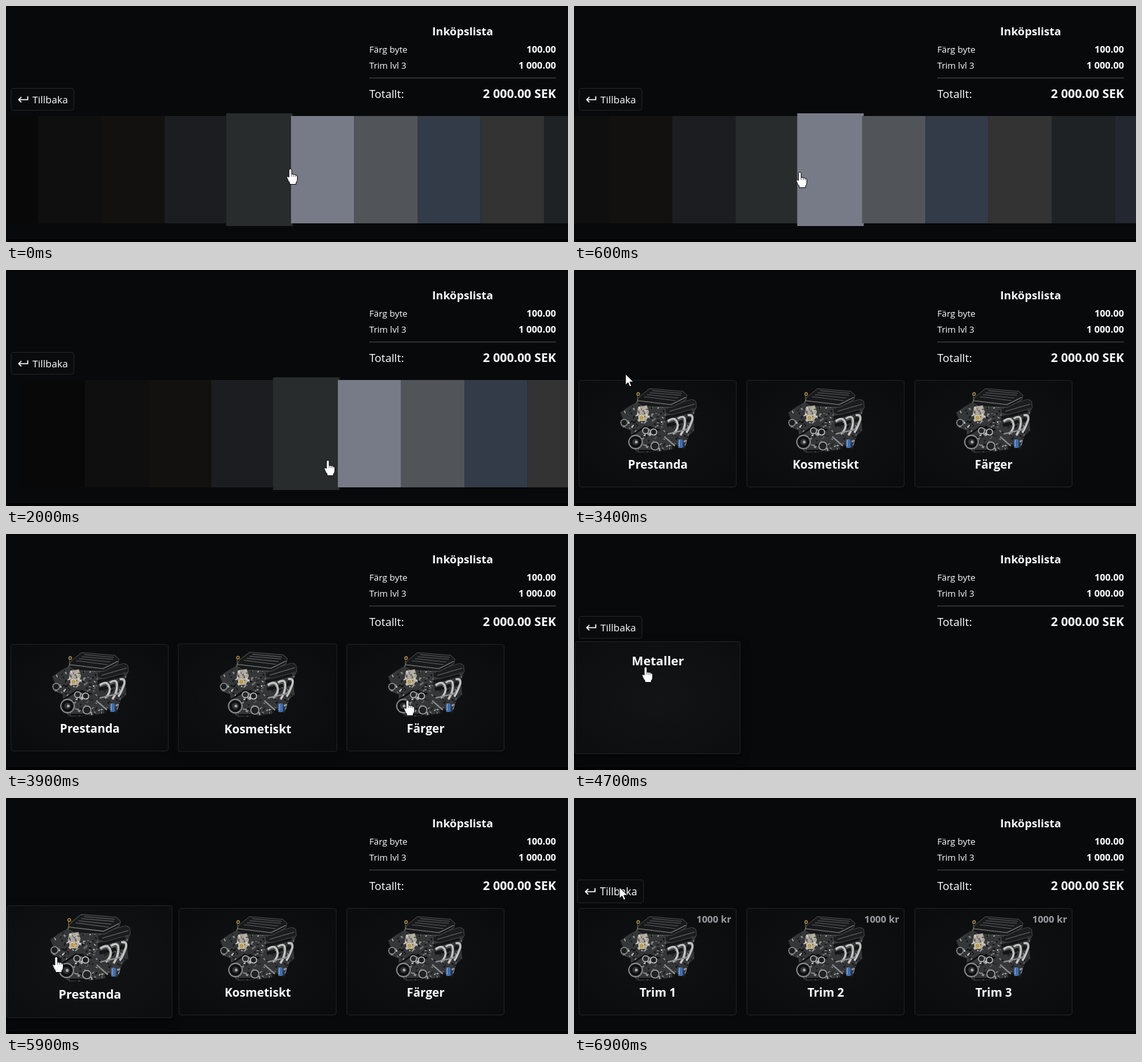
An HTML page for the animation above (7 s loop, 840 by 354 pixels).

```html
<!DOCTYPE html>
<html lang="sv">
<head>
<meta charset="utf-8">
<title>Inköpslista</title>
<style>
  html, body { margin: 0; width: 100%; height: 100%; overflow: hidden; background: #08090b; }
  svg { display: block; width: 840px; height: 354px; }
  text { font-family: "Open Sans", "Noto Sans", sans-serif; font-weight: 500; fill: #fff; }
  .b { font-weight: 700; }
  .r { text-anchor: end; }
  .m { text-anchor: middle; }
</style>
</head>
<body>
<svg id="stage" viewBox="0 0 840 354">
  <defs>
    <radialGradient id="panel" cx="50%" cy="50%" r="62%">
      <stop offset="0" stop-color="#101214"/>
      <stop offset="1" stop-color="#0b0c0e"/>
    </radialGradient>
    <clipPath id="block">
      <path id="outline" d="M69 214L80 206 92 199 150 203 180 194 182 209 178 219 180 242 172 247 165 268 152 262 146 269 128 272 96 274 84 265 85 241 69 234 74 225Z"/>
    </clipPath>
    <g id="engine"></g>
  </defs>
  <rect width="840" height="354" fill="#08090b"/>
  <rect y="350" width="840" height="4" fill="#020203"/>

  <text class="b m" x="682.5" y="44" font-size="16.6">Inköpslista</text>
  <text x="543" y="70" font-size="13.3">Färg byte</text>
  <text class="b r" x="822" y="70" font-size="14">100.00</text>
  <text x="543" y="94" font-size="13.2">Trim lvl 3</text>
  <text class="b r" x="822" y="94" font-size="14.1">1 000.00</text>
  <rect x="543" y="107" width="279" height="2" fill="#2a2b2e"/>
  <text x="543" y="138" font-size="16.6">Totallt:</text>
  <text class="b r" x="822" y="138" font-size="18.2">2 000.00 SEK</text>

  <g id="back">
    <rect x="7.5" y="123.5" width="94" height="33" rx="3.5" fill="#0a0b0d" stroke="#212427"/>
    <path d="M32.5 135.5V140.5H19M23 136.5L19 140.5L23 144.5" fill="none" stroke="#fff" stroke-width="1.6"/>
    <text x="39.5" y="146" font-size="14.9">Tillbaka</text>
  </g>
  <g id="pages"></g>
  <g id="cursor" stroke="#000" stroke-width=".9" fill="#fff" stroke-linejoin="round">
    <path id="arrow" d="M0 0V16.5L3.8 12.9 6.4 18.9 9 17.8 6.5 11.9H12Z"/>
    <g id="hand">
      <path d="M-2 1.2a2 2 0 0 1 4 0V7.4q1.5-1 3 .4q1.6-.8 2.8.7q2.6-.3 2.7 2.5V15q0 3-2 5v2.5H-1V20q-2-2-3.2-5.2L-5.3 12q.2-2.4 3.3-.4z"/>
      <path d="M2 7.4V11M5 8V11.2M7.8 8.6V11.4" fill="none" stroke-width=".6"/>
    </g>
  </g>
</svg>
<script>
const $ = id => document.getElementById(id);
const LOOP = 7000, STEP = 100, TOP = 165, HEIGHT = 161;
const SWATCH = { x: 23.5, w: 94.5 }, CARD = { x: 7, w: 236, gap: 251 };

const colors = ['#080808', '#0f0f0f', '#12110f', '#1c1d21', '#292c2d', '#777b87', '#515459',
  '#323b47', '#333333', '#1f2224', '#232730', '#151e1b', '#690000', '#8a0b00', '#6b0000', '#611009'];
const cards = {
  main: ['Prestanda', 'Kosmetiskt', 'Färger'],
  metal: ['Metaller'],
  parts: ['Motor', 'Bromsar', 'Växellåda', 'Turbo'],
  trim: ['Trim 1', 'Trim 2', 'Trim 3']
};

// [start, page]
const route = [[0, 'colors'], [3000, 'metal'], [3400, 'main'], [4300, 'metal'], [5000, 'colors'],
  [5400, 'metal'], [5700, 'main'], [6100, 'parts'], [6500, 'trim']];

// [time, x, y]
const pointer = [[0, 425, 245], [1200, 250, 255], [1300, 220, 258], [1400, 64, 261], [1600, 530, 288],
  [1700, 530, 288], [1800, 492, 287], [2000, 481, 286], [2500, 75, 215], [2700, 70, 150],
  [2800, 70, 138], [3000, 70, 138], [3200, 76, 150], [3300, 76, 150], [3400, 77, 156],
  [3900, 600, 250], [4200, 600, 250], [4450, 200, 215], [4700, 107, 200], [5000, 107, 200],
  [5300, 70, 140], [5600, 70, 142], [5700, 72, 172], [5900, 75, 239], [6500, 75, 239],
  [6700, 70, 150], [6900, 68, 134]];

// [time, offset]
const scroll = [[0, 70], [1200, 250], [1300, 300], [1400, 349.5], [1600, 0]];

function el(tag, attrs, parent, text) {
  const node = document.createElementNS('http://www.w3.org/2000/svg', tag);
  for (const k in attrs) node.setAttribute(k, attrs[k]);
  if (text) node.textContent = text;
  parent.appendChild(node);
  return node;
}

function sample(keys, t) {
  const n = keys.findIndex(k => k[0] > t);
  if (n < 0) return keys[keys.length - 1].slice(1);
  const a = keys[n - 1], b = keys[n], p = (t - a[0]) / (b[0] - a[0]);
  return a.slice(1).map((v, i) => v + (b[i + 1] - v) * p);
}

function drawEngine() {
  const g = $('engine');
  const path = (d, fill, stroke = 'none', width = 1) =>
    el('path', { d, fill, stroke, 'stroke-width': width, 'stroke-linejoin': 'round' }, g);
  const disc = (cx, cy, r, fill, stroke, width = 1.5) =>
    el('circle', { cx, cy, r, fill, stroke, 'stroke-width': width }, g);
  let seed = 11;
  const rnd = () => (seed = seed * 16807 % 2147483647) / 2147483647;
  // Small metal fittings scattered over a box
  function scatter(count, x, y, w, h, tones) {
    const bits = el('g', { 'clip-path': 'url(#block)', fill: 'none' }, g);
    for (let i = 0; i < count; i++)
      el('path', {
        d: `M${x + rnd() * w} ${y + rnd() * h}q${rnd() * 4} ${rnd() * 4 - 2} ${rnd() * 6 - 3} ${rnd() * 6 - 2}`,
        stroke: tones[i % tones.length], 'stroke-width': .8 + rnd() * 1.8
      }, bits);
  }

  path($('outline').getAttribute('d'), '#353637');
  scatter(230, 68, 202, 114, 72, ['#0d0e0f', '#a2a3a4', '#1a1b1c', '#6d6f70', '#c9c9c9', '#121314', '#858687']);
  // exhaust runners
  path('M137 222L176 211M139 233L177 224', 'none', '#141516', 5);
  path('M140 227Q150 219 154 228T148 246M155 223Q166 216 166 227T159 248M170 218Q180 216 176 227T168 244', 'none', '#c4c4c3', 3.2);
  path('M141 229Q150 222 152 230M156 226Q164 220 164 229', 'none', '#77797a', 1);
  path('M135 250L151 264M140 246L170 239', 'none', '#8f9091', 2);
  // rocker cover and lid
  path('M136 209L150 202 176 194 182 197 183 207 146 217 137 215Z', '#1b1c1d', '#4d4f51', .8);
  path('M143 212L180 201', 'none', '#6a6c6e', 1);
  path('M93 199L98 190 113 178 163 182 169 188 167 195 146 206 104 205Z', '#18191a', '#4c4e50', 1);
  path('M117 181L161 185M113 184L160 188M109 187L156 192M105 190L152 196', 'none', '#57595b', 1.2);
  path('M95 196L145 202 167 191', 'none', '#858687', 1.1);
  // throttle
  path('M96 205L109 203 112 213 108 227 98 226 94 215Z', '#aaa69d');
  scatter(24, 94, 203, 16, 22, ['#ded9cc', '#5e5b55', '#c0bbb0']);
  disc(101, 222, 4, '#b99c5c', '#e5d6ae', 1);
  disc(96, 186, 2, '#17181a', '#b28f44', 1.3);
  path('M95 188V199', 'none', '#8b733f', 1);
  // pulleys, belt and filter
  path('M82 251L106 235 128 240M97 271L122 271', 'none', '#0c0d0e', 2.6);
  disc(75, 229, 5, '#1b1c1d', '#8b8d8e');
  disc(107, 241, 4.5, '#26272a', '#b5b6b7');
  disc(119, 243, 4.5, '#1c1d1f', '#c2c3c4');
  disc(92, 258, 10, '#111213', '#88898a', 1.8);
  disc(92, 258, 6, '#303132', '#0d0e0f', 2);
  disc(93, 258, 2.2, '#a8a9aa', 'none');
  disc(121, 264, 6, '#202123', '#a4a5a6');
  el('rect', { x: 155.5, y: 254, width: 7, height: 13, rx: 2, fill: '#416eae' }, g);
  path('M157.5 255V265', 'none', '#86abd9', 1);
}

const pages = {};
function addPage(name) {
  const g = el('g', {}, $('pages'));
  return pages[name] = { g, items: [] };
}

function build() {
  drawEngine();
  const strip = addPage('colors');
  strip.items = colors.map((fill, i) => el('rect', {
    x: SWATCH.x + i * SWATCH.w, y: TOP, width: SWATCH.w + .2, height: HEIGHT, fill
  }, strip.g));

  for (const name in cards) {
    const page = addPage(name);
    cards[name].forEach((label, i) => {
      const slot = el('g', { transform: `translate(${i * CARD.gap} 0)` }, page.g);
      const card = el('g', {}, slot);
      const box = { x: 7.5, y: 165.5, width: 235, height: 160, rx: 3.5 };
      el('rect', { ...box, fill: 'url(#panel)', stroke: '#1e2123' }, card);
      card.glow = el('rect', { ...box, fill: '#fff', opacity: 0 }, card);
      if (name !== 'metal') el('use', { href: '#engine' }, card);
      if (name === 'trim')
        el('text', { class: 'b r', x: 235, y: 187, 'font-size': 14.4, style: 'fill:#999ca1' }, card, '1000 kr');
      el('text', { class: 'b m', x: 125.3, y: name === 'metal' ? 199 : 298, 'font-size': 17.6 }, card, label);
      page.items.push(card);
    });
  }
}

const leg = t => route.findLastIndex(r => r[0] <= t);

// What lies under the pointer: 'back', 'leg:item' or ''
function hit(t) {
  const [x, y] = sample(pointer, t), n = leg(t), name = route[n][1];
  if (name !== 'main' && x > 7 && x < 102 && y > 123 && y < 157) return 'back';
  if (y < TOP || y > TOP + HEIGHT) return '';
  if (name === 'colors') {
    const i = Math.floor((x + sample(scroll, t)[0] - SWATCH.x) / SWATCH.w);
    return colors[i] ? `${n}:${i}` : '';
  }
  const i = Math.floor((x - CARD.x) / CARD.gap);
  return cards[name][i] && x - CARD.x - i * CARD.gap < CARD.w ? `${n}:${i}` : '';
}

// Hover eases over two steps
function level(key, t) {
  const at = d => hit(Math.max(0, t - d)) === key;
  return (at(STEP) ? .8 : 0) + (at(2 * STEP) ? .2 : 0);
}

function grow(node, cx, cy, amount) {
  const s = 1 + .05 * amount;
  node.setAttribute('transform', `translate(${cx} ${cy}) scale(${s}) translate(${-cx} ${-cy})`);
}

function render(t) {
  const n = leg(t), name = route[n][1], under = hit(t);
  for (const k in pages) pages[k].g.style.display = k === name ? '' : 'none';
  $('back').style.display = name === 'main' ? 'none' : '';
  grow($('back'), 54.5, 140, level('back', t));

  const strip = name === 'colors';
  const page = pages[name];
  if (strip) page.g.setAttribute('transform', `translate(${-sample(scroll, t)[0]} 0)`);
  page.items.forEach((node, i) => {
    const v = level(`${n}:${i}`, t);
    grow(node, strip ? SWATCH.x + (i + .5) * SWATCH.w : 125, TOP + HEIGHT / 2, v);
    if (strip) return;
    node.glow.setAttribute('opacity', v * .008);
    node.style.filter = v ? `drop-shadow(0 4px 6px rgba(0,0,0,${v * .5}))` : '';
  });

  const [x, y] = sample(pointer, t), hand = under.includes(':');
  $('cursor').setAttribute('transform', `translate(${x} ${y})`);
  $('hand').style.display = hand ? '' : 'none';
  $('arrow').style.display = hand ? 'none' : '';
}

build();
const start = performance.now();
let last = -1;
function tick() {
  const t = Math.floor((performance.now() - start) % LOOP / STEP) * STEP;
  if (t !== last) render(last = t);
  requestAnimationFrame(tick);
}
tick();
</script>
</body>
</html>
```
